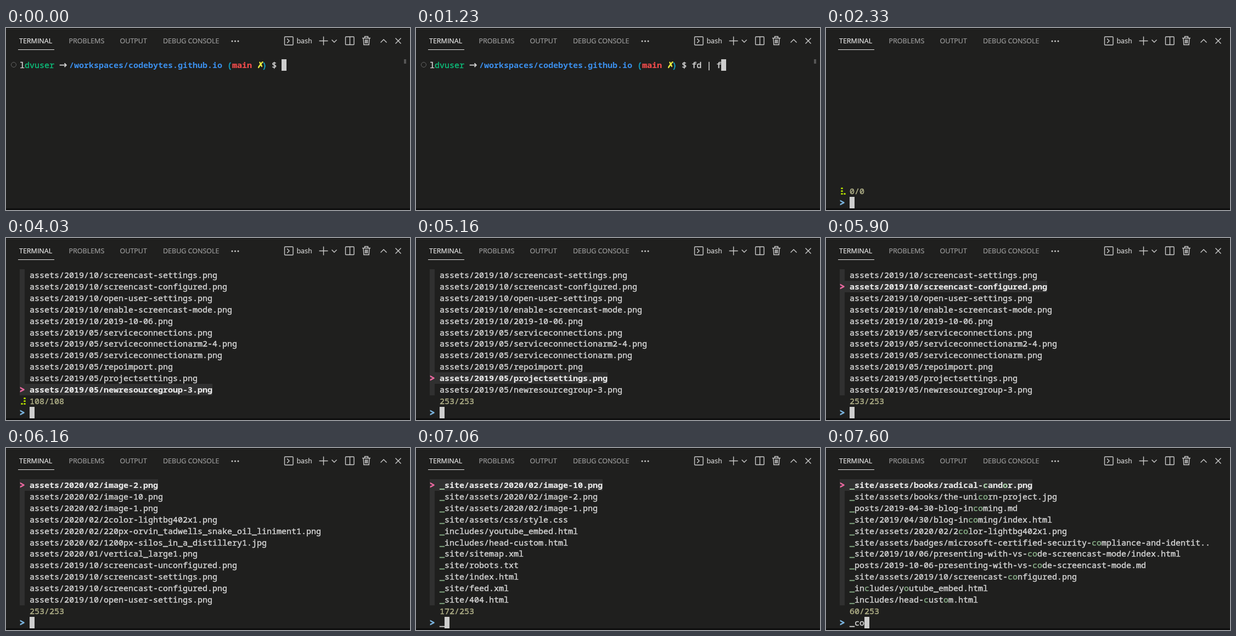
Recreate the animation shown at these times as an HTML page. Size 736 px wide and 332 px high, loop 8 s.

```html
<!DOCTYPE html>
<html lang="en">
<head>
<meta charset="utf-8">
<title>Terminal fuzzy finder</title>
<style>
  html, body { margin: 0; width: 100%; height: 100%; overflow: hidden; background: #1f1f1e; }
  #panel { position: absolute; left: 0; top: 0; width: 736px; height: 332px; overflow: hidden; background: #1f1f1e; }
  #panel::before { content: ""; position: absolute; left: 0; top: 0; width: 736px; height: 1px; background: #050505; border-bottom: 1px solid #303030; }
  #panel::after { content: ""; position: absolute; left: 0; bottom: 0; width: 736px; height: 3px; background: #0e0e0e; }
  .tab { position: absolute; top: 15px; font: 12.5px/18px "Open Sans", "Noto Sans", sans-serif; color: #9f9f9f; white-space: pre; -webkit-text-stroke: .2px; }
  .on { color: #ececec; }
  #line { position: absolute; left: 22px; top: 39px; width: 66px; height: 1px; background: #e7e7e7; }
  svg { position: absolute; left: 0; top: 0; }
  .icons { fill: none; stroke: #cccccc; stroke-width: 1.4; }
  .row { position: absolute; left: 25px; height: 21px; font: 15px/21px "Noto Sans Mono", monospace; color: #d4d4d4; white-space: pre; -webkit-text-stroke: .45px; }
  .row span { display: inline-block; height: 21px; vertical-align: top; }
  .cursor { width: 9px; background: #cdcdcd; }
  .gutter { width: 9px; margin-right: 9px; background: #303030; }
  .current { background: #303030; color: #e8e8e8; font-weight: 700; -webkit-text-stroke: .2px; }
  .pointer, .ask { width: 9px; font-size: 17px; font-weight: 700; text-indent: -.5px; -webkit-text-stroke: .5px; }
  .pointer { color: #f06ba4; }
  .ask { color: #7db8e4; }
  .hit { color: #87af87; }
  .current .hit { color: #afd7af; }
  .info { color: #afaf87; }
  .user { color: #0dbc79; }
  .path { color: #3b8eea; font-weight: 700; -webkit-text-stroke: 0; }
  .paren { color: #11a8cd; }
  .branch { color: #f14c4c; font-weight: 700; -webkit-text-stroke: .2px; }
  .arrow { width: 18px; font: 17px/21px "DejaVu Sans", sans-serif; }
  .dirty { width: 9px; color: #f5f543; font: bold 16px/21px "DejaVu Sans", sans-serif; }
  .ring { position: absolute; left: 8.5px; top: 62px; width: 8px; height: 8px; border: 1.6px solid #656565; border-radius: 50%; }
  .thumb { position: absolute; left: 725px; top: 57px; width: 4px; height: 8px; background: #555; }
  .dot { position: absolute; width: 3.4px; height: 3.4px; border-radius: 50%; background: #afd700; }
</style>
</head>
<body>
<div id="panel">
  <span class="tab on" style="left:24px">TERMINAL</span>
  <span class="tab" style="left:114.6px">PROBLEMS</span>
  <span class="tab" style="left:207.6px">OUTPUT</span>
  <span class="tab" style="left:286px">DEBUG CONSOLE</span>
  <span class="tab on" style="left:529.4px;color:#d4d4d4">bash</span>
  <div id="line"></div>
  <svg class="icons" width="736" height="50">
    <g fill="#cccccc" stroke="none">
      <circle cx="412" cy="24" r="1.5"/><circle cx="417.500" cy="24" r="1.5"/><circle cx="423" cy="24" r="1.5"/>
    </g>
    <rect x="507.500" y="16" width="15.500" height="15" rx="1"/>
    <path d="M512 19.500l4 4-4 4"/>
    <path d="M578.500 15.500v16M570.500 23.500h16"/>
    <path d="M593.500 21.500l4.500 4.500 4.500-4.500"/>
    <rect x="618.500" y="16" width="15.500" height="14.500" rx="1"/>
    <path d="M626.500 16v14.500"/>
    <path d="M649 18.500h15M653.500 18v-2.500h6v2.500M651 18.500l.8 12h9.400l.8-12M654.500 21v7M656.500 21v7M658.500 21v7"/>
    <path d="M682.500 26.500l5.500-5.500 5.500 5.500"/>
    <path d="M709.500 18.500l10 10M719.500 18.500l-10 10"/>
  </svg>
  <div id="screen"></div>
</div>
<script>
const LOOP = 8000;
const ROW_PITCH = 20.9;
const COMMAND = 'fd | fzf';
const KEYS = [400, 450, 500, 660, 1000, 1230, 1330, 1900];
// each braille character encodes its six dots as bits
const SPINNER = [...'⠋⠙⠹⠸⠼⠴⠦⠧⠇⠏'].map(c => c.charCodeAt(0) - 0x2800);

const inDir = (dir, names) => names.split(' ').map(n => dir + n);
// listed from the bottom row upwards
const FILES = [
  ...inDir('assets/2019/05/', 'newresourcegroup-3.png projectsettings.png repoimport.png serviceconnectionarm.png serviceconnectionarm2-4.png serviceconnections.png'),
  ...inDir('assets/2019/10/', '2019-10-06.png enable-screencast-mode.png open-user-settings.png screencast-configured.png screencast-settings.png screencast-unconfigured.png'),
  'assets/2020/01/vertical_large1.png',
  ...inDir('assets/2020/02/', '1200px-silos_in_a_distillery1.jpg 220px-orvin_tadwells_snake_oil_liniment1.png 2color-lightbg402x1.png image-1.png image-10.png image-2.png image-3.png image-4.png')
];
const UNDERSCORE = [
  ...inDir('_site/', '404.html feed.xml index.html robots.txt sitemap.xml'),
  ...inDir('_includes/', 'head-custom.html youtube_embed.html'),
  ...inDir('_site/assets/', 'css/style.css 2020/02/image-1.png 2020/02/image-2.png 2020/02/image-10.png')
];
const MATCHES = [
  ...inDir('_includes/', 'head-custom.html youtube_embed.html'),
  '_site/assets/2019/10/screencast-configured.png',
  '_posts/2019-10-06-presenting-with-vs-code-screencast-mode.md',
  '_site/2019/10/06/presenting-with-vs-code-screencast-mode/index.html',
  '_site/assets/badges/microsoft-certified-security-compliance-and-identit..',
  '_site/assets/2020/02/2color-lightbg402x1.png',
  '_site/2019/04/30/blog-incoming/index.html',
  '_posts/2019-04-30-blog-incoming.md',
  ...inDir('_site/assets/books/', 'the-unicorn-project.jpg radical-candor.png')
];

const span = (cls, text = '') => `<span class="${cls}">${text}</span>`;
const row = (n, html) => `<div class="row" style="top:${Math.round(57 + ROW_PITCH * n)}px">${html}</div>`;
const cursor = span('cursor');

function shell(t) {
  const typed = KEYS.filter(k => t >= k).length;
  const entered = t >= 2200;
  return '<div class="ring"></div><div class="thumb"></div>' +
    row(0, 'l' + span('user', 'dvuser') + ' ' + span('arrow', '→') +
      span('path', '/workspaces/codebytes.github.io') + ' ' + span('paren', '(') +
      span('branch', 'main') + ' ' + span('dirty', '✗') + span('paren', ')') + ' $ ' +
      COMMAND.slice(0, typed) + (entered ? '' : cursor)) +
    (entered ? row(1, cursor) : '');
}

function spinner(t) {
  const bits = SPINNER[(Math.floor((t - 2300) / 100) + 7) % 10];
  let html = '';
  for (let i = 0; i < 6; i++) {
    if (bits >> i & 1) {
      const x = 27.3 + 5 * Math.floor(i / 3), y = 291 + 4.8 * (i % 3);
      html += `<i class="dot" style="left:${x}px;top:${y}px"></i>`;
    }
  }
  return html;
}

function mark(text, query) {
  if (!query) return text;
  const rules = {
    '_': [/^(_)(.*)$/],
    '_c': [/^(_)(.*)(c)(.*)$/],
    '_co': [/^(_)(.*)(co)(.*)$/, /^(_)(.*)(c)(.*?)(o)(.*)$/]
  }[query];
  const found = rules.map(r => text.match(r)).find(Boolean);
  return found.slice(1).map((s, i) => i % 2 ? s : span('hit', s)).join('');
}

function selected(t) {
  if (t < 5160) return 0;
  if (t < 5630) return 1;
  if (t < 5900) return 2 + Math.floor((t - 5630) * 7 / 270);
  if (t < 6160) return 9 + Math.floor((t - 5900) * 9 / 260);
  return t < 6230 ? 18 : t < 6300 ? 19 : 20;
}

function count(t) {
  if (t < 4030) return '0/0';
  if (t >= 7600) return '60/253';
  if (t >= 7530) return '118/253';
  if (t >= 7060) return '172/253';
  const read = t >= 4500 ? 253 : 108 + 28 * Math.max(0, Math.floor((t - 4000) / 100));
  return read + '/' + read;
}

function finder(t) {
  const query = t >= 7600 ? '_co' : t >= 7530 ? '_c' : t >= 7060 ? '_' : '';
  const files = query === '' ? FILES : query === '_' ? UNDERSCORE : MATCHES;
  const index = selected(t);
  const offset = query ? 0 : Math.max(0, index - 10);
  const active = Math.min(index, 10);
  let html = '';
  if (t >= 4030) {
    for (let i = 0; i <= 10; i++) {
      const text = mark(files[offset + i], query);
      html += row(10 - i, i === active
        ? span('current', span('pointer', '&gt;') + ' ' + text)
        : span('gutter') + text);
    }
  }
  if (t >= 2330) html += row(11, '  ' + span('info', count(t)));
  if (t >= 2330 && t < 4500) html += spinner(t);
  return html + row(12, span('ask', '&gt;') + ' ' + query + cursor);
}

const screen = document.getElementById('screen');
let shown = '';
function draw(now) {
  const t = now % LOOP;
  const html = t < 2300 ? shell(t) : finder(t);
  if (html !== shown) screen.innerHTML = shown = html;
}

const start = performance.now();
function tick() {
  draw(performance.now() - start);
  requestAnimationFrame(tick);
}
tick();
</script>
</body>
</html>
```
